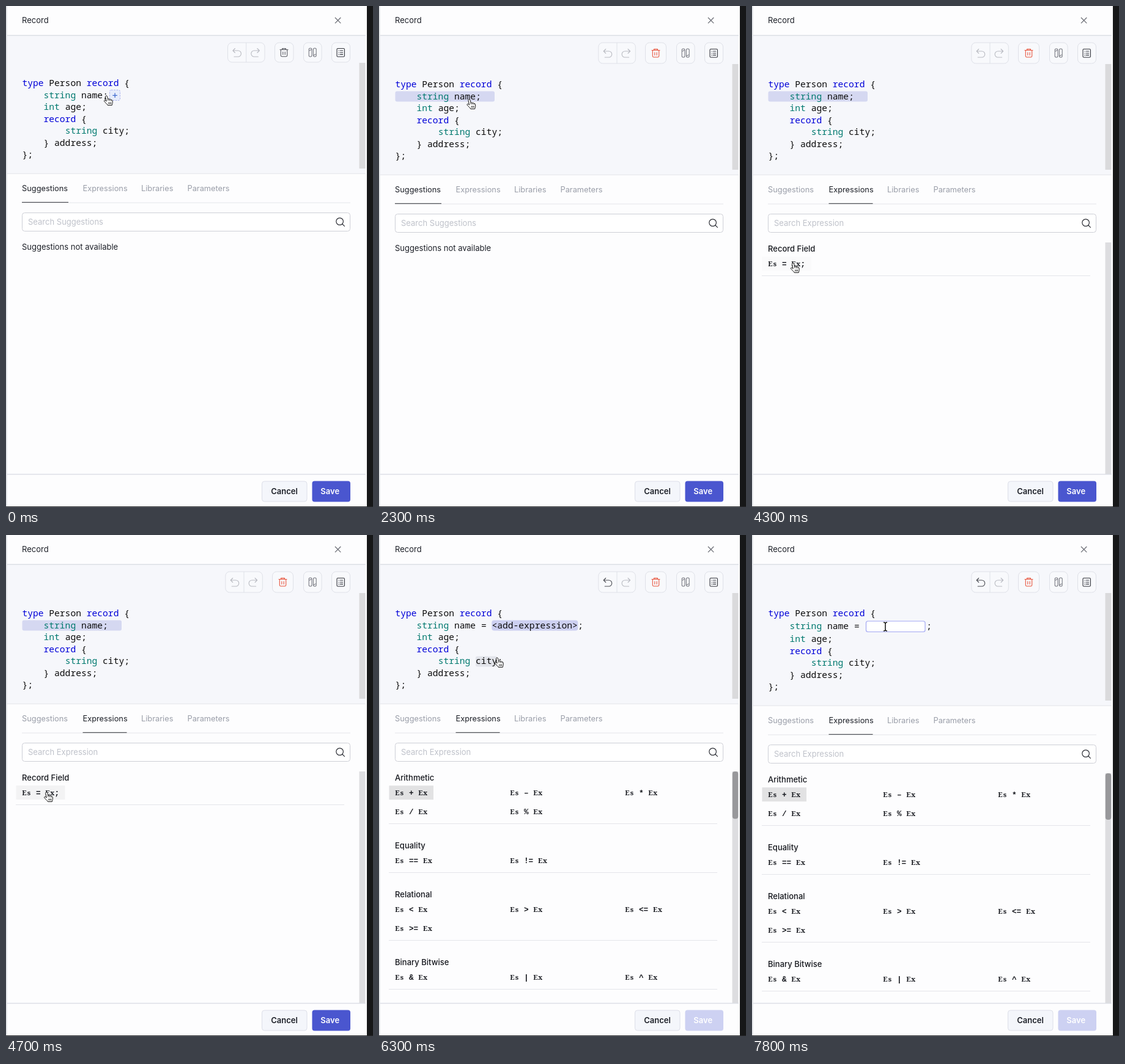
These frames come from a looping animation (600 by 820 pixels, 8000 ms). An HTML page:

```html
<!DOCTYPE html>
<html lang="en">
<head>
<meta charset="utf-8">
<title>Record editor</title>
<style>
  html, body { margin: 0; width: 100%; height: 100%; overflow: hidden; background: #fdfdfe; }
  svg { display: block; width: 100vw; height: 100vh; }
  text { font-family: Inter, sans-serif; font-size: 13px; fill: #1d2028; }
  .tab { font-size: 12.8px; fill: #9a9ea9; }
  .on { fill: #1d2028; }
  .head { font-weight: 500; fill: #15171d; }
  .hint { fill: #bfc2ca; }
  .mid { text-anchor: middle; font-weight: 600; }
  .code text { font-family: "Noto Sans Mono", monospace; font-size: 14.63px; fill: #0c0c0c; }
  .code .key { fill: #0000d8; }
  .code .kind { fill: #00796f; }
  .cell { font-family: "Liberation Mono", monospace; font-size: 12.7px; font-weight: 600; fill: #15171d; text-anchor: middle; }
  .cell .slab { font-family: "Noto Serif", serif; font-size: 11.2px; }
  .icon { fill: none; stroke: #4c4e55; stroke-width: 1.1; stroke-linecap: round; stroke-linejoin: round; }
  .line { stroke: #e4e5ea; }
</style>
</head>
<body>
<svg id="stage" viewBox="0 0 600 820" preserveAspectRatio="none"></svg>
<script>
const LOOP = 8000;
const SELECT = 300, TAB = 3600, INSERT = 4800, EDIT = 7200;
const CELL = 8.78, LEFT = 26.4, PITCH = 19.5;

const text = (x, y, s, cls = '') => `<text x="${x}" y="${y}" class="${cls}">${s.replace(/&/g, '&amp;').replace(/</g, '&lt;')}</text>`;
const box = (x, y, w, h, fill, r = 0, more = '') => `<rect x="${x}" y="${y}" width="${w}" height="${h}" rx="${r}" fill="${fill}" ${more}/>`;
const rule = (x1, x2, y) => `<path class="line" d="M${x1} ${y}H${x2}"/>`;
const group = (id, body, more = '') => `<g id="${id}" ${more}>${body}</g>`;

// Code token at a line and a column
const token = (row, col, s, cls) => text((LEFT + col * CELL).toFixed(2), 131.2 + row * PITCH, s, cls);

// Typewriter row: slab letters and plain operators, each centred in its cell
function cell(x, y, s) {
  const chars = [...s].map((c, i) => {
    if (c === ' ') return '';
    const safe = c === '<' ? '&lt;' : c === '&' ? '&amp;' : c;
    const at = (x + 3.8 + i * 7.64).toFixed(2);
    return `<tspan x="${at}" class="${/\w/.test(c) ? 'slab' : ''}">${safe}</tspan>`;
  });
  return `<text class="cell" y="${y + 4}">${chars.join('')}</text>`;
}

function expressions() {
  const sections = [
    ['Arithmetic', '+ - * / %'],
    ['Equality', '== !='],
    ['Relational', '< > <= >='],
    ['Binary Bitwise', '& | ^']
  ];
  let y = 395, out = '';
  for (const [title, ops] of sections) {
    out += text(26, y + 4.5, title, 'head');
    const list = ops.split(' ');
    list.forEach((op, i) => {
      out += cell(26 + (i % 3) * 188, y + 25 + Math.floor(i / 3) * 31, `Es ${op === '-' ? '–' : op} Ex`);
    });
    y += 25 + Math.floor((list.length - 1) / 3) * 31 + 19.5;
    out += rule(16, 553, y);
    y += 35.5;
  }
  return out;
}

const undoPath = 'M-3-7L-6.5-3.5L-3 0M-6.5-3.5H2a5 5 0 0 1 0 10H-4.5';
const frame = (x, w, id) => `<rect id="${id}" x="${x}" y="60" width="${w}" height="32.5" rx="7" fill="#f8f9fc" stroke="#dfe1e8"/>`;

const toolbar =
  group('history',
    frame(362.5, 60.5, 'frameA') + '<path id="split" stroke="#dfe1e8" d="M392.7 60v33"/>' +
    group('arrows',
      `<path id="undo" class="icon" transform="translate(377.4 76.5)" d="${undoPath}"/>` +
      `<path class="icon" style="stroke:#b9bbc2" transform="translate(407.8 76.5) scale(-1 1)" d="${undoPath}"/>`)) +
  frame(439.5, 30.5, 'frameB') + frame(486.5, 29.5, 'frameC') + frame(532.5, 30, 'frameD') +
  group('icons',
    '<path id="trash" class="icon" d="M448 71.5H461M451.5 71.5V69.6h6v1.9M449.3 71.5v9.6q0 1.6 1.6 1.6h7.2q1.6 0 1.6-1.6v-9.6M452.8 75v4.5M456.2 75v4.5"/>' +
    '<g class="icon" style="stroke:#787a82"><rect x="495.2" y="69" width="4.8" height="14" rx="2.2"/><rect x="502.4" y="69" width="4.8" height="14" rx="2.2"/><path d="M496 73l3-1.5M503.2 80.5l3-1.5"/></g>' +
    '<g class="icon" style="stroke:#33353c"><rect x="541" y="69.5" width="12.4" height="13.5" rx="1.5"/><path d="M544 73h.3M546.3 73h4.3M544 76.2h.3M546.3 76.2h4.3M544 79.4h.3M546.3 79.4h4.3"/></g>');

const code =
  box(158, 196.5, 35.5, 17, '#e2e4ea', 3, 'id="city"') +
  box(26.5, 137.5, 162.5, 17, '#d5d8f1', 3, 'id="selection"') +
  box(184.3, 137.5, 141, 17, '#cdd0f1', 4, 'id="slot"') +
  token(0, 0, 'type', 'key') + token(0, 5, 'Person') + token(0, 12, 'record', 'key') + token(0, 19, '{') +
  group('second',
    token(1, 4, 'string', 'kind') + token(1, 11, 'name') +
    group('plain', token(1, 15, ';')) +
    group('assign', token(1, 16, '=')) +
    group('filled', token(1, 18, '<add-expression>') + token(1, 34, ';')) +
    group('editing', box(186.5, 137.5, 96.5, 17.5, '#fff', 3, 'stroke="#a3a8f3" stroke-width="1.2"') + text(285, 150.7, ';'))) +
  group('rest',
    token(2, 4, 'int', 'kind') + token(2, 8, 'age;') +
    token(3, 4, 'record', 'key') + token(3, 11, '{') +
    token(4, 8, 'string', 'kind') + token(4, 15, 'city;') +
    token(5, 4, '} address;') + token(6, 0, '};')) +
  group('plus',
    box(169.5, 137.5, 17, 17, '#e6ecfb', 2.5, 'id="plusBox" stroke="#a9b2ee" stroke-dasharray="2.5 1.8"') +
    '<path id="plusSign" fill="none" stroke="#3f6bd0" stroke-width="1.3" d="M174.3 146.3h7.6M178.1 142.5v7.6"/>');

const lower =
  text(26, 303.3, 'Suggestions', 'tab" id="tabA') + text(125.5, 303.3, 'Expressions', 'tab" id="tabB') +
  text(221, 303.3, 'Libraries', 'tab') + text(296.5, 303.3, 'Parameters', 'tab') +
  rule(26, 563, 322) + '<path id="underline" stroke="#2b2d34"/>' +
  box(26.5, 338.5, 536, 30, '#fff', 4, 'stroke="#cdcfd6"') +
  '<g class="icon" style="stroke:#2c2e35;stroke-width:1.2"><circle cx="545.6" cy="352.6" r="5.8"/><path d="M550 357l3.4 3.4"/></g>' +
  group('empty', text(36, 357.8, 'Search Suggestions', 'hint') + text(26, 398.7, 'Suggestions not available')) +
  group('panel', text(36, 357.8, 'Search Expression', 'hint') + box(577.5, 385, 10, 400, '#dddde0')) +
  group('field', box(16.5, 408, 80, 23, '#f3f3f4', 0, 'id="fieldHover"') +
    text(26, 399.5, 'Record Field', 'head') + cell(26, 420, 'Es = Ex;') + rule(16, 553, 439.5)) +
  group('list', box(16.5, 408.2, 72.5, 23, '#e2e2e3') + expressions() + box(577.8, 385, 9.4, 77.5, '#98989b', 4, 'id="thumb"')) +
  group('tip', box(39, 445, 40, 26, '#fff', 4, 'filter="url(#shade)"') + text(47.3, 462.7, 'Add'));

const footer =
  box(2, 767, 587, 52, '#fdfdfe') + '<path d="M2 766.5H588" stroke="#dcdee5" stroke-width="1.6"/>' +
  box(418.5, 778, 73.5, 33, '#f4f6fb', 4, 'stroke="#dddfe9"') + text(455, 799.3, 'Cancel', 'mid') +
  box(500.5, 777.5, 62.5, 34, '#4a56cf', 4, 'id="save"') + text(529.7, 799.3, 'Save', 'mid" style="fill:#fff');

const pointer =
  group('hand',
    '<path fill="#fff" stroke="#111" stroke-linejoin="round" d="M-1.6 1.3C-1.4-.6 1.2-.6 1.6 1.2L2.6 5.6C3.3 4.6 5 4.9 5.3 6C6.2 5.2 7.6 5.6 7.9 6.8C9 6.3 10 7 10.1 8.2L10.2 11.3C10.1 13 9.4 13.6 9.2 15.4H2.2C1.9 13.6-2 11.2-3.5 8.8C-3.9 7.3-2.3 6.7-1 7.9L.2 9Z"/>' +
    '<path fill="none" stroke="#111" stroke-width=".9" d="M2.6 5.6l.5 2.5M5.3 6l.4 2.3M7.9 6.8l.2 1.7M3.8 10.5v3M5.7 10.5v3M7.6 10.5v3"/>') +
  group('beam', '<path fill="none" stroke="#fff" stroke-width="2.8" d="M0-6V6"/><path fill="none" stroke="#111" stroke-width="1.5" d="M-3-7Q0-7 0-5Q0-7 3-7M0-5V5M-3 7Q0 7 0 5Q0 7 3 7"/>');

const stage = document.getElementById('stage');
stage.innerHTML =
  '<defs><filter id="shade" x="-50%" y="-50%" width="200%" height="220%"><feDropShadow dx="0" dy="2" stdDeviation="4" flood-color="#000" flood-opacity=".25"/></filter></defs>' +
  box(0, 0, 600, 820, '#fdfdfe') + box(0, 0, 1.7, 820, '#dcdee3') +
  text(26, 27.5, 'Record') + '<path class="icon" style="stroke:#6c6e76;stroke-width:1.3" d="M538.3 19.3l8.6 8.6M546.9 19.3l-8.6 8.6"/>' +
  box(2, 48.5, 586, 226, '#f6f7fb', 0, 'id="editor"') + '<path d="M2 48.3H588" stroke="#dcdfe6" stroke-width="1.4"/>' +
  toolbar +
  box(577.5, 93, 10, 173, '#dadadc', 0, 'id="bar"') +
  group('code', code, 'class="code"') +
  group('lower', rule(2, 588, 274.3) + lower) +
  footer +
  box(590, 0, 10, 820, '#161718') + box(0, 819, 600, 1, '#26272a') +
  group('pointer', pointer);

const $ = id => document.getElementById(id);
const set = (id, attrs) => { for (const k in attrs) $(id).setAttribute(k, attrs[k]); };
const show = (id, on) => $(id).setAttribute('opacity', +on);
const move = (id, x, y) => $(id).setAttribute('transform', `translate(${x} ${y})`);
const ramp = (t, a, b) => Math.min(1, Math.max(0, (t - a) / (b - a)));

// Pointer tip: time, x, y
const path = [
  [0, 164, 147], [300, 164, 147], [800, 162, 147], [1200, 156, 150], [1800, 156, 150],
  [2300, 147.5, 153], [2700, 148, 160], [3400, 162, 298], [3600, 162, 298], [4300, 67, 421],
  [4600, 67, 421], [5100, 58.5, 421.5], [5400, 58.5, 421.5], [6200, 193, 201], [6350, 193, 201],
  [7000, 218, 150], [LOOP, 218, 150]
];
function tipAt(t) {
  const i = Math.max(1, path.findIndex(p => p[0] > t));
  const [t0, x0, y0] = path[i - 1], [t1, x1, y1] = path[i];
  const k = ramp(t, t0, t1), e = k * k * (3 - 2 * k);
  return [x0 + (x1 - x0) * e, y0 + (y1 - y0) * e];
}

function draw(t) {
  const selected = t >= SELECT, tabbed = t >= TAB, inserted = t >= INSERT, editing = t >= EDIT;
  const shift = selected ? 2 : 0, drop = shift + (editing ? 3 : 0);

  // Toolbar grows a little once a statement is selected
  for (const id of ['frameA', 'frameB', 'frameC', 'frameD']) set(id, { height: 32 + shift });
  set('frameB', { x: selected ? 435.5 : 439.5, width: selected ? 34 : 30.5 });
  move('history', selected ? -3.7 : 0, 0);
  set('split', { d: `M392.7 60v${32 + shift}` });
  move('arrows', 0, shift / 2);
  move('icons', 0, shift / 2);
  set('trash', { transform: `translate(${selected ? -2 : 0} 0)`, style: `stroke:${selected ? '#e8563f' : '#55575e'}` });
  $('undo').style.stroke = inserted ? '#4c4e55' : '#b9bbc2';

  move('code', 0, shift);
  move('second', 0, editing ? 1.5 : 0);
  move('rest', 0, editing ? 3 : 0);
  set('bar', { y: 93 + shift, height: editing ? 176 : 173 });
  set('editor', { height: 226 + drop });
  set('thumb', { height: editing ? 76 : 77.5 });
  move('lower', 0, drop);

  show('selection', selected && !inserted);
  show('plain', !inserted);
  show('assign', inserted);
  show('filled', inserted && !editing);
  show('slot', inserted && !editing);
  show('editing', editing);
  show('city', t >= 6100 && t < 6550);
  show('plus', 1 - ramp(t, 900, 1200));
  move('plus', selected ? 1 : 0, 0);
  set('plusBox', { fill: selected ? '#e4e5f6' : '#e6ecfb', stroke: selected ? '#b9a9e2' : '#a9b2ee' });
  set('plusSign', { stroke: selected ? '#4a9aa8' : '#3f6bd0' });

  $('tabA').setAttribute('class', tabbed ? 'tab' : 'tab on');
  $('tabB').setAttribute('class', tabbed ? 'tab on' : 'tab');
  set('underline', { d: tabbed ? 'M125.5 321.3H197.5' : 'M26 321.3H102' });
  show('empty', !tabbed);
  show('panel', tabbed);
  show('field', tabbed && !inserted);
  show('fieldHover', ramp(t, 4200, 4500));
  show('list', inserted);
  show('tip', ramp(t, 4950, 5080) * (1 - ramp(t, 5450, 5600)));
  show('save', 1 - 0.735 * ramp(t, 4880, 5420));

  const [x, y] = tipAt(t);
  move('pointer', x.toFixed(2), y.toFixed(2));
  show('hand', !editing);
  show('beam', editing);
}

function tick(now) {
  draw(now % LOOP);
  requestAnimationFrame(tick);
}
draw(0);
requestAnimationFrame(tick);
</script>
</body>
</html>
```
